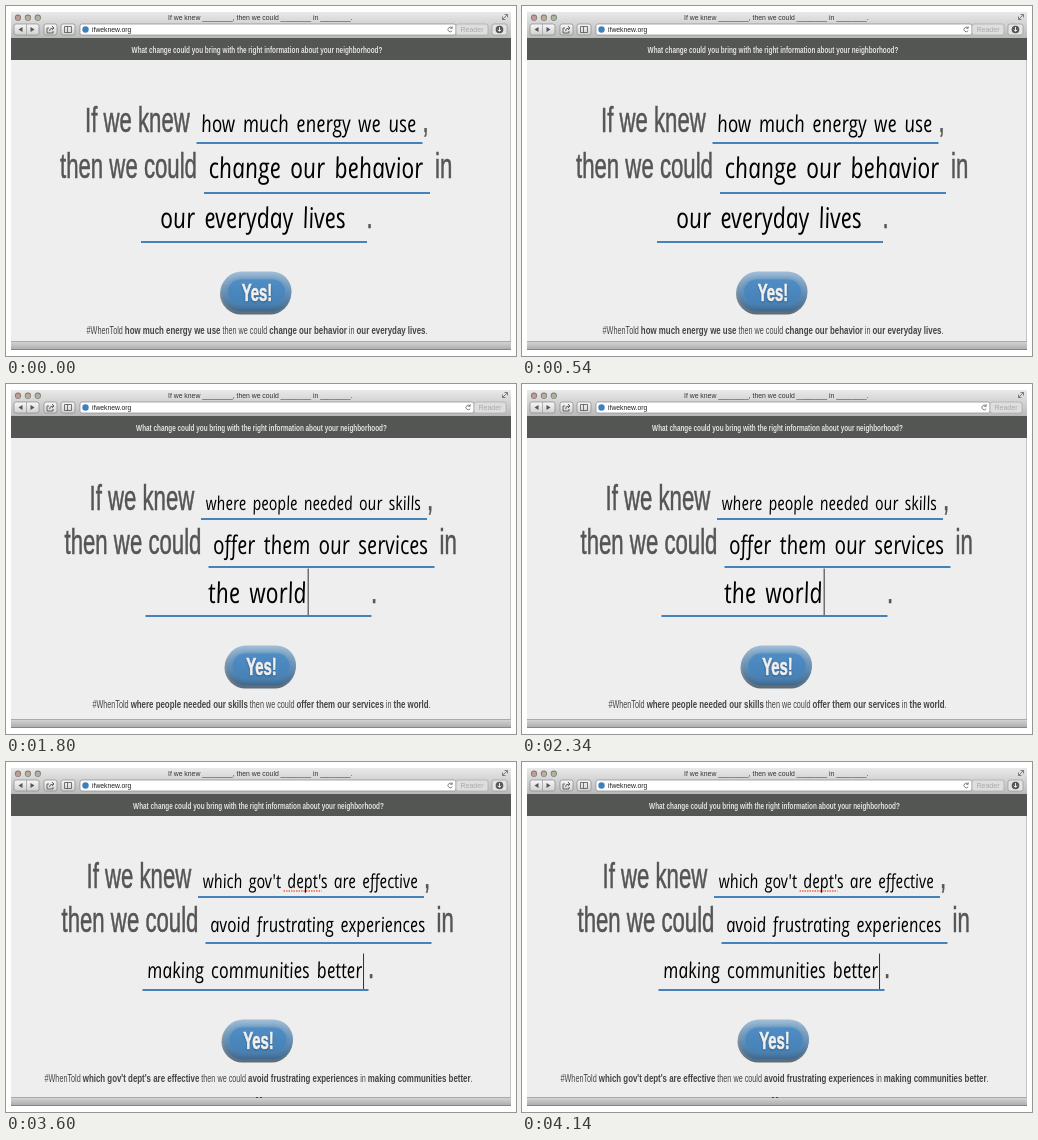
Animation of 510x350 px, one loop 4500 ms. Source, as an HTML page with a canvas:

```html
<!DOCTYPE html>
<html lang="en">
<head>
<meta charset="utf-8">
<title>If we knew</title>
<style>
  html, body { margin: 0; width: 100%; height: 100%; overflow: hidden; background: #fff; }
  canvas { display: block; }
</style>
</head>
<body>
<canvas id="stage" width="510" height="350"></canvas>
<script>
const ctx = document.getElementById('stage').getContext('2d');
const HOLD = 900;
const SANS = '"Liberation Sans", Arial, sans-serif';
const HAND = '"Open Sans", "Noto Sans", sans-serif';
const FIELD = 226;

// dx: page shift; base: text baselines; rule: underline positions
const scenes = [
  { words: ['how much energy we use', 'change our behavior', 'our everyday lives'],
    dx: 0, base: [126, 172, 222], rule: [136, 186, 235], download: true },
  { words: ['when small businesses are in trouble', 'help them with legal and financial', 'New York'],
    dx: 3.5, base: [126, 169, 215], rule: [133, 178, 227], caret: true, marks: true },
  { words: ['where people needed our skills', 'offer them our services', 'the world'],
    dx: 4.5, base: [126, 170, 219], rule: [134, 182, 231], caret: true },
  { words: ['where volunteers are needed', 'volunteer', 'the Rockaways'],
    dx: 3.5, base: [126, 170, 221], rule: [134, 184, 233], caret: true },
  { words: ["which gov't dept's are effective", 'avoid frustrating experiences', 'making communities better'],
    dx: 1.5, base: [126, 170, 216], rule: [134, 180, 227], caret: true, marks: true,
    download: true, spelling: true }
];

function rect(x, y, w, h, fill) {
  ctx.fillStyle = fill;
  ctx.fillRect(x, y, w, h);
}

function pill(x, y, w, h, r, fill, stroke) {
  ctx.beginPath();
  ctx.roundRect(x, y, w, h, r);
  ctx.fillStyle = fill;
  ctx.fill();
  if (stroke) {
    ctx.strokeStyle = stroke;
    ctx.lineWidth = 0.7;
    ctx.stroke();
  }
}

function path(d, color, width = 1) {
  ctx.strokeStyle = color;
  ctx.lineWidth = width;
  ctx.stroke(new Path2D(d));
}

function dot(x, y, r, fill) {
  pill(x - r, y - r, 2 * r, 2 * r, r, fill);
}

function shade(y0, y1, from, to) {
  const g = ctx.createLinearGradient(0, y0, 0, y1);
  g.addColorStop(0, from);
  g.addColorStop(1, to);
  return g;
}

// Condensed text; returns its drawn width
function text(str, x, y, font, color, squeeze = 1, align = 'left', { slant = 0, heavy = 0 } = {}) {
  ctx.save();
  ctx.font = font;
  ctx.textAlign = align;
  ctx.fillStyle = ctx.strokeStyle = color;
  ctx.transform(squeeze, 0, slant, 1, x, y);
  ctx.fillText(str, 0, 0);
  if (heavy) {
    ctx.shadowColor = 'transparent';
    ctx.lineWidth = heavy;
    ctx.strokeText(str, 0, 0);
  }
  const width = ctx.measureText(str).width * squeeze;
  ctx.restore();
  return width;
}

function browser(scene) {
  const right = scene.download ? 450 : 468;
  rect(5, 6, 500, 338, '#eee');
  rect(5, 6, 500, 26, shade(6, 32, '#e9e9e9', '#b9b9b9'));
  ['#c09a93', '#c0ad8c', '#b0b39c'].forEach((c, i) => {
    dot(12 + i * 9.9, 11.7, 3.1, '#777');
    dot(12 + i * 9.9, 11.9, 2.4, c);
  });
  const blank = '_'.repeat(8);
  text(`If we knew ${blank}, then we could ${blank} in ${blank}.`, 162, 14, '6.85px ' + SANS, '#333');
  path('M496.5 13.5l5-5M498.5 8.5h3v3M496.5 10.5v3h3', '#666', 0.8);

  for (const [x, w] of [[8, 25], [38, 13], [55, 14]])
    pill(x, 18, w, 11, 2, shade(18, 29, '#f8f8f8', '#d0d0d0'), '#888');
  path('M20.5 18v11', '#999', 0.7);
  ctx.fillStyle = '#555';
  ctx.fill(new Path2D('M16.5 21v5l-4-2.5zM24.5 21v5l4-2.5z'));
  path('M43 22h-2v5h6v-2M43.5 25q0-3 4-3M46 20l2 2l-2 2', '#555', 0.9);
  path('M58.5 20.5h7v6h-7zM61.5 20.5v6', '#555', 0.8);

  pill(74, 18, right - 74, 11, 2, '#fff', '#888');
  dot(79.5, 23.5, 3.2, '#3f7fbd');
  text('ifweknew.org', 86, 26, '6.8px ' + SANS, '#222');
  const x = right - 6;
  path(`M${x + 2} 22a2.3 2.3 0 1 0 .3 2.5M${x + 2.2} 20.3v2h-2`, '#666', 0.8);
  pill(right, 18, 32, 11, 2, '#dedede', '#aaa');
  text('Reader', right + 16, 26, '7px ' + SANS, '#aaa', 1, 'center');
  if (scene.download) {
    pill(486, 18, 15, 11, 2, '#e4e4e4', '#999');
    dot(493.5, 23.5, 3.8, '#555');
    path('M493.5 21v4M491.8 23.7l1.7 1.7l1.7-1.7', '#fff', 0.9);
  }

  rect(5, 32, 500, 22, '#545653');
  rect(504, 54, 1, 281, '#c4c4c4');
  rect(5, 335, 500, 9, shade(335, 344, '#d8d8d8', '#a9a9a9'));
  rect(5, 335, 500, 0.7, '#999');
  rect(5, 343.3, 500, 0.7, '#777');
  if (scene.marks) {
    rect(250, 335, 2, 1, '#444');
    rect(254, 335, 2, 1, '#444');
  }
}

// Handwriting, centred in its field and shrunk when too long
function answer(str, x, y) {
  const squeeze = 0.8;
  const font = size => `italic ${size}px ${HAND}`;
  ctx.save();
  ctx.letterSpacing = '0.01px'; // turns ligatures off
  ctx.font = font(100);
  const unit = ctx.measureText(str).width / 100 + 0.15 * (str.split(' ').length - 1);
  const size = Math.min(28.5, 215 / (unit * squeeze));
  ctx.wordSpacing = 0.15 * size + 'px';
  const width = text(str, x + FIELD / 2, y, font(size), '#000', squeeze, 'center', { slant: 0.14 });
  ctx.restore();
  return { size, end: x + (FIELD + width) / 2 };
}

function sentence({ words, base, rule, caret, spelling }) {
  const big = (str, x, y) =>
    text(str, x, y, '35px ' + SANS, '#555', 0.634, 'left', { heavy: 0.6 });
  big('If we knew', 79, base[0]);
  big(',', 416.5, base[0]);
  big('then we could', 54, base[1]);
  big('in', 429, base[1]);
  big('.', 360.5, base[2]);
  [190.5, 198, 135].forEach((x, i) => {
    rect(x, rule[i], FIELD, 2, '#4682b8');
    const { size, end } = answer(words[i], x, base[i]);
    if (i === 2 && caret) rect(end, rule[2] - size * 1.63, 1, size * 1.63, '#333');
  });
  if (spelling) {
    ctx.save();
    ctx.setLineDash([1.5, 1]);
    path('M276 129h38', '#df6a45', 1.5);
    ctx.restore();
  }
}

function button(y) {
  pill(214, y + 1, 71, 42, 21, shade(y, y + 43, '#a9bccb', '#5d6a76'));
  pill(215.5, y, 70, 40, 20, shade(y, y + 40, '#a3bfd7', '#3b6890'));
  ctx.save();
  ctx.shadowColor = '#4a88bf';
  ctx.shadowBlur = 7;
  pill(222, y + 8, 57, 25, 12.5, shade(y + 8, y + 33, '#4f8dc4', '#4681b6'));
  ctx.shadowColor = 'rgba(0,0,0,.45)';
  ctx.shadowBlur = 2;
  ctx.shadowOffsetY = 1;
  text('Yes!', 251, y + 29, `bold 24px ${SANS}`, '#f0f0f0', 0.62, 'center', { heavy: 0.7 });
  ctx.restore();
}

function summary(words, y) {
  const light = ['10.5px ' + SANS, '#444', 0.69];
  const bold = [`bold 10.5px ${SANS}`, '#444', 0.752];
  const runs = [['#WhenTold ', light], [words[0], bold], [' then we could ', light],
    [words[1], bold], [' in ', light], [words[2], bold], ['.', light]];
  const total = runs.reduce((sum, [str, [font, , squeeze]]) => {
    ctx.font = font;
    return sum + ctx.measureText(str).width * squeeze;
  }, 0);
  let x = 251 - total / 2;
  for (const [str, style] of runs) x += text(str, x, y, ...style);
}

function draw(now) {
  const scene = scenes[Math.floor(now / HOLD) % scenes.length];
  ctx.clearRect(0, 0, 510, 350);
  browser(scene);
  ctx.save();
  ctx.translate(scene.dx, 0);
  text('What change could you bring with the right information about your neighborhood?',
    251, 46.5, `bold 9.2px ${SANS}`, '#e2e2e2', 0.693, 'center');
  sentence(scene);
  const top = scene.rule[2] + 30.5;
  button(top);
  summary(scene.words, top + 62);
  ctx.restore();
}

function tick() {
  draw(performance.now());
  requestAnimationFrame(tick);
}
tick();
</script>
</body>
</html>
```
